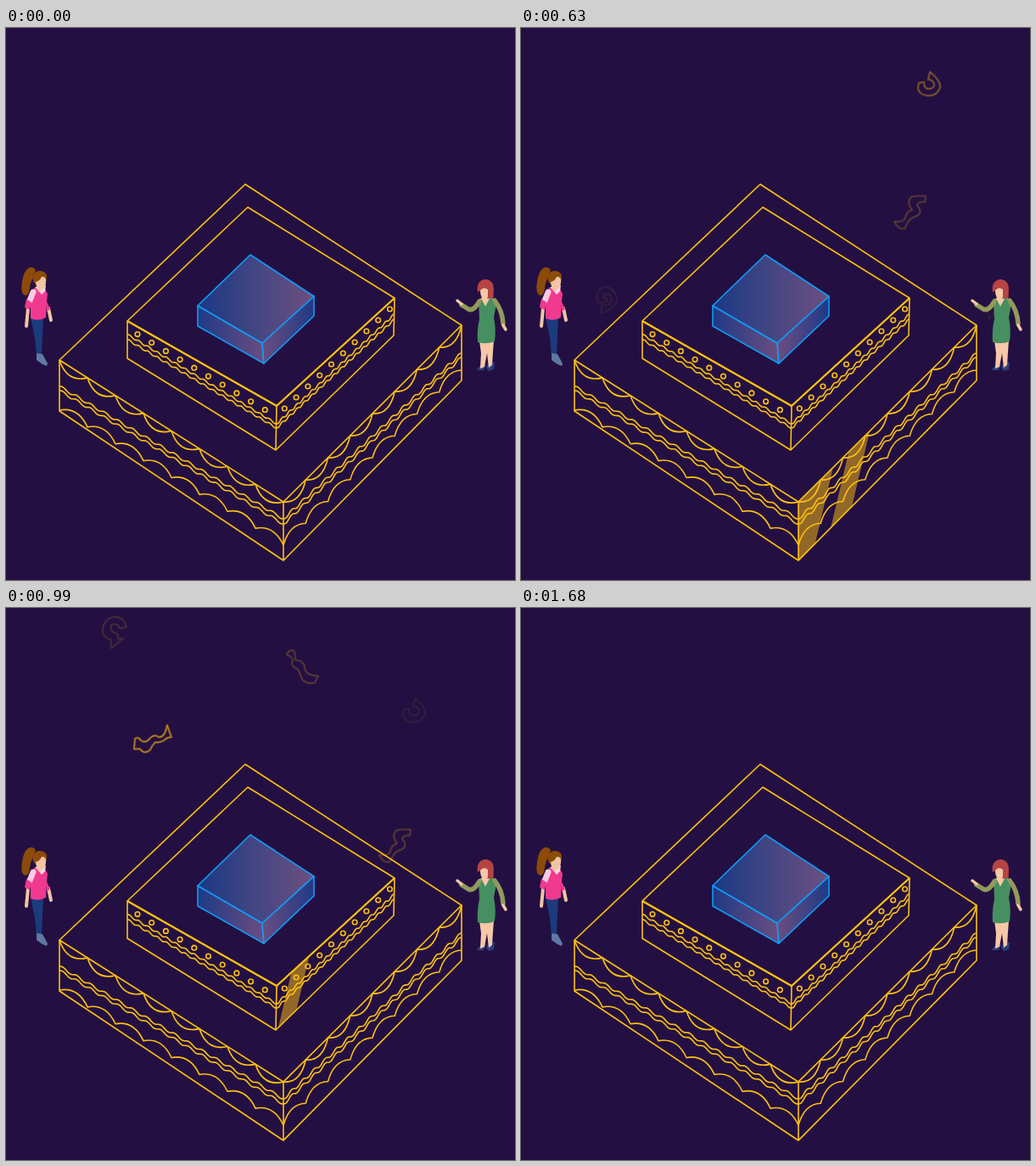
Recreate the animation shown at these times as an HTML page. Size 600 by 650 pixels, loop 1.83 s.

```html
<!DOCTYPE html>
<html lang="en">
<head>
<meta charset="utf-8">
<title>Cake</title>
<style>
  html, body { margin: 0; width: 100%; height: 100%; overflow: hidden; background: #240f42; }
  svg { display: block; width: 600px; height: 650px; }
  .gold { fill: none; stroke: #ffc20e; stroke-width: 1.6; stroke-linejoin: round; }
  .blue { stroke: #0f9cf8; stroke-width: 1.6; stroke-linejoin: round; }
  .band { fill: #ffc20e; fill-opacity: .5; }
  .limb { fill: none; stroke-linecap: round; stroke-linejoin: round; }
</style>
</head>
<body>
<svg viewBox="0 0 600 650">
  <defs>
    <linearGradient id="top"><stop stop-color="#1b3884"/><stop offset=".45" stop-color="#3f4583"/><stop offset="1" stop-color="#6d4f80"/></linearGradient>
    <linearGradient id="left"><stop stop-color="#1f3a86"/><stop offset="1" stop-color="#6b4d80"/></linearGradient>
    <linearGradient id="right"><stop stop-color="#6b4d80"/><stop offset="1" stop-color="#1f3a86"/></linearGradient>
    <clipPath id="baseFace"><path d="M327 558L537 350V415L327 627Z"/></clipPath>
    <clipPath id="tierFace"><path d="M319 445L458 318L457 362L318 497Z"/></clipPath>
  </defs>

  <g clip-path="url(#baseFace)"><g id="baseBand" class="band"/></g>
  <g clip-path="url(#tierFace)"><g id="tierBand" class="band"/></g>

  <g class="gold">
    <path d="M282 184L537 350L327 558L63 391ZM63 391V451L327 627L537 415V350M327 558V627"/>
    <path d="M285 211L458 318L319 445L143 345ZM143 345V389L318 497L457 362L458 318M319 445L318 497"/>
    <path stroke-width="2.1" d="M143 345L319 445L458 318"/>
    <path id="trim"/>
    <g id="dots"/>
  </g>

  <g class="blue">
    <path fill="url(#left)" d="M226 327L302 371L304 395L226 351Z"/>
    <path fill="url(#right)" d="M302 371L363 316V339L304 395Z"/>
    <path fill="url(#top)" d="M288 267L363 316L302 371L226 327Z"/>
  </g>

  <g id="leftWoman">
    <path fill="#8c4b08" d="M35 285C31 279 23 281 20 294C17 307 18 314 23 315C29 314 27 304 30 298C32 293 33 289 35 285Z"/>
    <path class="limb" stroke="#f0c4a4" stroke-width="4" d="M26 330L24 351M50 330L53 344"/>
    <path fill="#1b3b7c" d="M29 341L44 343L43 361L42 386H36L34 365Z"/>
    <path fill="#5f78a4" d="M36 383L43 384L49 395L48 398L43 396L36 391Z"/>
    <path fill="#ef3a90" d="M33 306L45 305L49 313L48 322L47 341Q38 346 29 342L29 320Z"/>
    <path class="limb" stroke="#f9cbe0" stroke-width="7" d="M32 311L28 321"/>
    <path fill="#ef3a90" d="M24 319L30 323L28 332L22 329ZM47 320L52 331L48 334Z"/>
    <path fill="#f9d3e3" d="M34 305L41 305L47 303L46 310L42 314L38 309Z"/>
    <path fill="#8c4b08" d="M31 293C33 284 45 284 48 291Q48 300 45 303H36Q32 300 31 293Z"/>
    <path fill="#f0c4a4" d="M35 299Q40 298 42 293Q48 292 47 300Q46 307 42 308L39 311L36 305Z"/>
  </g>

  <g id="rightWoman">
    <path class="limb" stroke="#929a5b" stroke-width="5.5" d="M558 322Q551 334 545 331L537 326M576 321Q585 332 586 348"/>
    <path class="limb" stroke="#f5c8a8" stroke-width="3.5" d="M537 325L532 321M586 350L589 355"/>
    <path fill="#2a3f7c" d="M555 402L560 396H566L563 403H556ZM566 400L570 391L576 394L575 402L569 404Z"/>
    <path fill="#f5c8a8" d="M558 368H575L574 382L573 397L569 400L567 383L564 399L559 401L560 383Z"/>
    <path fill="#468f60" d="M557 319L573 317L578 325L575 341Q578 355 576 369Q567 373 556 370Q555 355 558 343Z"/>
    <path fill="#929a5b" d="M556 320L562 317L558 329ZM572 317L579 322L577 329Z"/>
    <path fill="#f5c8a8" d="M560 318L571 317L565 328Z"/>
    <path fill="#b54443" d="M556 311C553 293 571 293 574 302C576 307 574 314 575 317Q570 320 566 318L560 309Z"/>
    <path fill="#f5c8a8" d="M559 309Q563 304 568 308L568 317L565 320Q559 319 559 309Z"/>
  </g>

  <g id="confetti" fill="none" stroke="#ffc20e" stroke-linejoin="round"></g>
</svg>

<script>
const LOOP = 1830, STEP = 30, FALL = 540;
const byId = id => document.getElementById(id);
const add = (parent, tag, attrs) => {
  const el = document.createElementNS("http://www.w3.org/2000/svg", tag);
  for (const name in attrs) el.setAttribute(name, attrs[name]);
  return parent.appendChild(el);
};

// Eight scallops from a to b; (cx, cy) is each scallop's control point.
function scallops(ax, ay, bx, by, cx, cy) {
  const arc = `q${cx} ${cy} ${(bx - ax) / 8} ${(by - ay) / 8}`;
  return `M${ax} ${ay}` + arc.repeat(8);
}

// Stair-like ripple that starts and ends level.
function wave(ax, ay, bx, by) {
  const count = 16, perCycle = 8, total = count * perCycle;
  const swing = (by - ay) / count / 2 / Math.PI;
  let d = "";
  for (let i = 0; i <= total; i++) {
    const x = ax + (bx - ax) * i / total;
    const y = ay + (by - ay) * i / total - swing * Math.sin(i / perCycle * 2 * Math.PI);
    d += `${i ? "L" : "M"}${x.toFixed(1)} ${y.toFixed(1)}`;
  }
  return d;
}

byId("trim").setAttribute("d", [
  scallops(63, 391, 327, 558, 9, 27),
  scallops(327, 558, 537, 350, 20, 2),
  scallops(63, 450, 327, 609, 22, -4),
  scallops(327, 609, 537, 403, 7, -25),
  wave(63, 422, 327, 578), wave(63, 427, 327, 584),
  wave(327, 578, 537, 383), wave(327, 584, 537, 388),
  wave(143, 361, 319, 466), wave(143, 367, 319, 471),
  wave(319, 466, 458, 337), wave(319, 471, 458, 343)
].join(""));

for (let i = 0; i < 10; i++) {
  add(byId("dots"), "circle", { cx: 155 + 16.7 * i, cy: 360.6 + 9.9 * i, r: 2.8 });
  add(byId("dots"), "circle", { cx: 328.3 + 13.8 * i, cy: 448 - 13 * i, r: 2.8 });
}

// Glints: a narrow stripe leading a wide one.
const glints = [
  { el: byId("baseBand"), x: 427, y: 558, at: 750, scale: 1 },
  { el: byId("tierBand"), x: 411.5, y: 445, at: 1200, scale: .87 }
];
for (const { el, scale } of glints)
  for (const [x, width] of [[-19, 19], [-72, 39]])
    add(el, "rect", { x: x * scale, width: width * scale, y: -260, height: 400 });

// Each path is drawn where the piece is at time `at`.
const pieces = [
  { starts: [120, 1140], at: 1440, speed: .167, d: "M90 287Q88 270 101 270Q112 272 113 285Q112 294 95 301L95 292Q107 292 107 283Q105 276 98 279Q94 284 101 283Q103 287 98 288Q93 290 90 287Z" },
  { starts: [120, 1140], at: 1440, speed: .167, d: "M549 292L561 296L552 308Z" },
  { starts: [480], at: 750, speed: .152, d: "M482 70Q495 80 494 88Q491 98 480 98Q469 97 468 89L469 83L475 82Q475 90 481 90Q488 89 487 84Q485 79 480 79Z" },
  { starts: [540], at: 750, speed: .175, d: "M477 219L476 226Q468 225 467 230Q474 238 467 242Q458 245 456 250L452 257Q445 259 440 249L446 249Q453 249 454 241Q456 237 461 235Q454 226 460 220Q468 218 477 219Z" },
  { starts: [750], at: 990, speed: .176, d: "M152 154Q156 151 159 156Q165 160 170 153Q175 148 180 152Q187 153 190 138L195 152Q190 152 186 156Q181 159 176 158Q172 162 170 167Q163 173 158 166L151 166Z" },
  { starts: [900], at: 1200, speed: .19, d: "M331 95Q332 89 339 90Q342 95 341 101Q350 102 352 108Q351 119 368 120L364 128Q352 130 348 122Q346 113 342 111Q335 108 338 101Q336 96 331 95Z" },
  { starts: [930], at: 1200, speed: .156, d: "M142 55Q139 43 127 43Q113 47 114 62Q117 69 124 70L124 80L138 69L132 69Q134 64 128 62Q122 59 124 53Q131 49 134 57Z" }
];
for (const piece of pieces) {
  piece.el = add(byId("confetti"), "g", {});
  add(piece.el, "path", { d: piece.d, "stroke-width": 3, "stroke-opacity": .3 });
  add(piece.el, "path", { d: piece.d, "stroke-width": 1.4, "stroke-opacity": .7 });
}

const clamp = v => Math.max(0, Math.min(1, v));

function draw(now) {
  const t = Math.floor(now % LOOP / STEP) * STEP;
  for (const { el, x, y, at } of glints) {
    const lead = x + .297 * (t - at);
    el.setAttribute("transform", `translate(${lead} ${y}) skewX(-13.3)`);
    el.setAttribute("opacity", clamp((at + 180 - t) / 150));
  }
  for (const { el, starts, at, speed } of pieces) {
    const start = starts.findLast(s => s <= t) ?? starts[0];
    const fade = clamp(1 - Math.abs((t - start) / FALL * 2 - 1));
    const lastStart = starts[starts.length - 1];
    el.setAttribute("transform", `translate(0 ${speed * (t - start + lastStart - at)})`);
    el.setAttribute("opacity", fade * .9);
  }
}

const begin = performance.now();
function tick() {
  draw(performance.now() - begin);
  requestAnimationFrame(tick);
}
tick();
</script>
</body>
</html>
```
